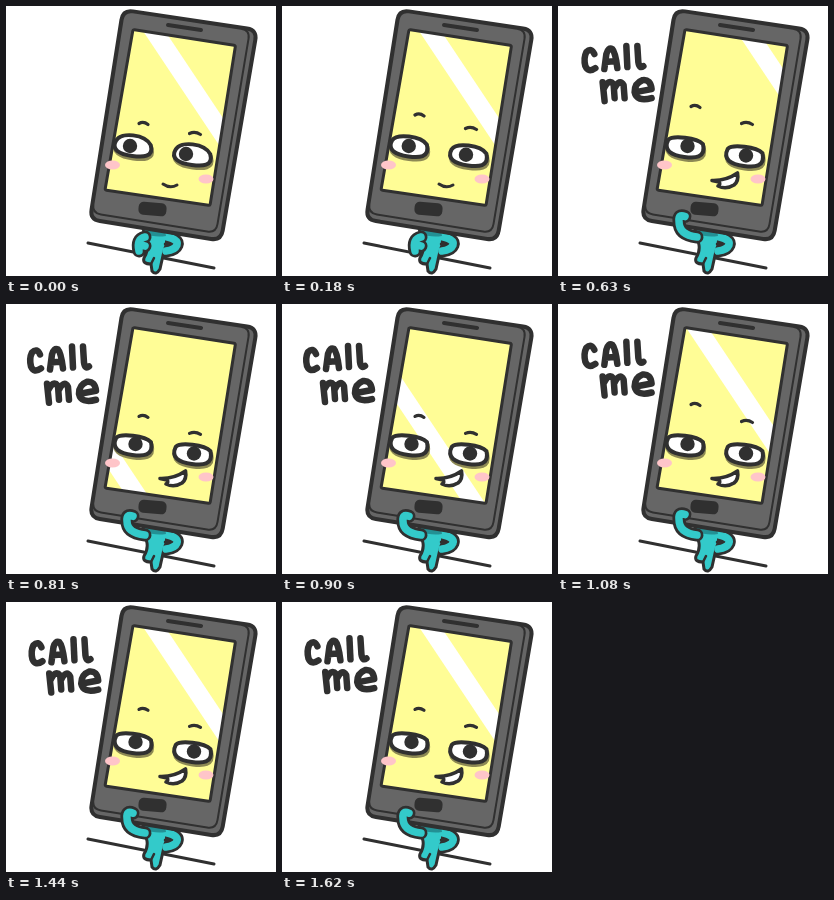
Animation, 270 px wide and 270 px high, one loop 1.71 s. Source, as an HTML page:

```html
<!DOCTYPE html>
<html lang="en">
<head>
<meta charset="utf-8">
<title>Call me</title>
<style>
html, body { margin: 0; width: 100%; height: 100%; overflow: hidden; background: #fff; }
svg { display: block; width: 100vw; height: 100vh; }
.ink { fill: none; stroke: #303030; stroke-linecap: round; stroke-linejoin: round; }
.skin { stroke: #33caca; }
</style>
</head>
<body>
<svg viewBox="0 0 270 270" role="img" aria-label="CAll me">
  <defs><clipPath id="glass"><path id="glassShape"/></clipPath></defs>

  <g class="ink" stroke-width="6.5">
    <g id="call">
      <path d="M34 50Q31 43 26 48Q23 54 25 62Q28 69 35 64"/>
      <path d="M44 65L46 50Q48 43 52 45Q55 48 57 64M45 58L56 57"/>
      <path d="M66 42L67 63"/>
      <path d="M77 42L78 58Q79 65 83 62"/>
    </g>
    <g id="me">
      <path d="M41 79L43 98M42 86Q47 75 52 81L53 95M53 85Q58 75 62 82L63 95"/>
      <path d="M74 89L90 86Q89 76 81 77Q73 80 73 89Q75 99 90 95"/>
    </g>
  </g>

  <path class="ink" stroke-width="3" d="M82 237L208 262"/>

  <path class="ink" stroke-width="13" d="M158 230Q173 233 171 239Q169 244 160 245"/>
  <path class="ink" style="fill:#33caca" stroke-width="3" d="M137 222L160 225Q162 237 158 245L154 263Q150 270 146 265L145 258Q136 258 138 252Q142 246 141 239Z"/>
  <path class="ink skin" stroke-width="7.5" d="M157 230Q173 233 171 239Q169 244 160 245"/>
  <path class="ink" stroke-width="2.5" d="M145 258L148 252M159 238L163 238"/>
  <path fill="#239094" d="M138.500 222L159 225L160 230Q148 232 139 227Z"/>

  <path id="shell" class="ink" style="fill:#666" stroke-width="4"/>
  <path id="front" class="ink" style="fill:#666" stroke-width="2"/>
  <path class="ink" stroke-width="4" d="M162 19L195 24"/>
  <rect x="132.500" y="196.500" width="28" height="13" rx="5" fill="#303030" transform="rotate(5 146 203)"/>
  <g clip-path="url(#glass)">
    <rect width="270" height="270" fill="#fffd96"/>
    <path id="shine" fill="#fff" d="M79 -62H101L301 238H279Z"/>
  </g>
  <path id="bezel" class="ink" stroke-width="3"/>
  <g fill="#ffc5c9">
    <ellipse cx="106.500" cy="159" rx="7.500" ry="4.500"/>
    <ellipse cx="200" cy="173" rx="7.500" ry="4.500"/>
  </g>
  <g id="eyes"></g>
  <path id="brows" class="ink" stroke-width="3.200"/>
  <path id="mouth" class="ink"/>

  <path id="armEdge" class="ink" stroke-width="13"/>
  <path id="arm" class="ink skin" stroke-width="7.500"/>
</svg>
<script>
const LOOP = 1710, STEP = 90, BEAT = 450;
const $ = id => document.getElementById(id);
const set = (id, name, value) => $(id).setAttribute(name, value);
const lerp = (a, b, k) => a + (b - a) * k;
const span = (t, from, length) => Math.min(1, Math.max(0, (t - from) / length));
const easeOut = (k, power) => 1 - (1 - k) ** power;

// Closed polygon with rounded corners.
function rounded(pts, r) {
  const toward = (p, q) => {
    const k = r / Math.hypot(q[0] - p[0], q[1] - p[1]);
    return [lerp(p[0], q[0], k), lerp(p[1], q[1], k)];
  };
  const n = pts.length;
  return pts.map((p, i) =>
    `${i ? 'L' : 'M'}${toward(p, pts[(i + n - 1) % n])}Q${p} ${toward(p, pts[(i + 1) % n])}`
  ).join('') + 'Z';
}

const screen = rounded([[127, 23.5], [229.5, 39.5], [204, 199.5], [99, 184]], 1.5);
set('shell', 'd', rounded([[117, 4], [251, 24], [215, 234.5], [84, 213.5]], 10));
set('front', 'd', rounded([[118, 5], [244, 24], [210, 227], [86, 207]], 9));
set('glassShape', 'd', screen);
set('bezel', 'd', screen);

function eye(x, y, px, py, lid) {
  const top = lerp(-13, -10.5, lid), edge = lerp(-3, -5, lid);
  const d = `M-18 ${edge}C-14 ${top} 10 ${top} 17 ${edge}C22 9 10 10 0 10C-13 10 -22 6 -18 ${edge}Z`;
  return `<g transform="translate(${x} ${y}) rotate(7)">
    <path d="${d}" transform="translate(1 2.5)" fill="#8d8954" stroke="#8d8954" stroke-width="4"/>
    <path d="${d}" class="ink" style="fill:#fff" stroke-width="4"/></g>
    <circle cx="${px}" cy="${py}" r="7.2" fill="#303030"/>`;
}

const brow = (x, y, w) => `M${x - w} ${y + 0.5}Q${x} ${y - 2} ${x + w} ${y + 1.5}`;

// The band leaves upwards with growing speed, then glides back in from below.
const shineX = t => t < 720
  ? 41 * (Math.max(0, t - 360) / 270) ** 2
  : -200 * (1 - span(t, 720, 450)) ** 2;

function draw(ms) {
  const t = Math.floor((ms % LOOP) / STEP) * STEP;
  const look = span(t, 90, 180);
  const grin = t >= 270;
  const pulse = Math.cos((t - 630) / BEAT * 2 * Math.PI);

  // Words slide out from behind the phone, then sway while rising slowly.
  const hidden = 1 - easeOut(span(t, 180, 360), 3);
  const rise = (t - 900) / 990;
  const word = (id, sway, lift) => set(id, 'transform',
    `translate(${110 * hidden + sway * (pulse + 0.8)} ${110 * hidden - lift * rise - sway * 1.4 * (pulse + 0.8)})`);
  word('call', 1.3, 5);
  word('me', 2, 8);

  set('shine', 'transform', `translate(${shineX(t)} 0)`);

  $('eyes').innerHTML =
    eye(127.5, lerp(140, 141, look), lerp(124, 129.5, look), 140, look) +
    eye(187, lerp(149, 150, look), lerp(180, 188, look), lerp(148, 149.5, look), look);

  const raise = 12 * look * ((1 + pulse) / 2) ** 2;
  set('brows', 'd',
    brow(137.5, lerp(117, 112, look) - raise, 4.5) +
    brow(189, lerp(127, 129, look) - raise, 5.5));

  set('mouth', 'd', grin
    ? 'M154 174.5Q168 175 179.500 167Q181 175 176 179Q168 184 160 180Q163 178 161 176Z'
    : 'M157 178Q164 183 171 179');
  set('mouth', 'stroke-width', grin ? 3.6 : 3);
  set('mouth', 'style', grin ? 'fill:#fff' : 'fill:none');

  const up = easeOut(span(t, 180, BEAT), 2);
  const hx = lerp(134, 122, up), hy = lerp(241, 212.5, up) - pulse * up;
  const arm = `M${hx + 5} ${hy - 1}Q${hx - 2} ${hy - 4} ${hx - 1} ${hy + 4}`
    + `Q${lerp(130, 121, up)} ${lerp(233, 229, up)} 139 231`;
  set('armEdge', 'd', arm);
  set('arm', 'd', arm);
}

function tick(now) {
  draw(now);
  requestAnimationFrame(tick);
}
draw(0);
requestAnimationFrame(tick);
</script>
</body>
</html>
```
